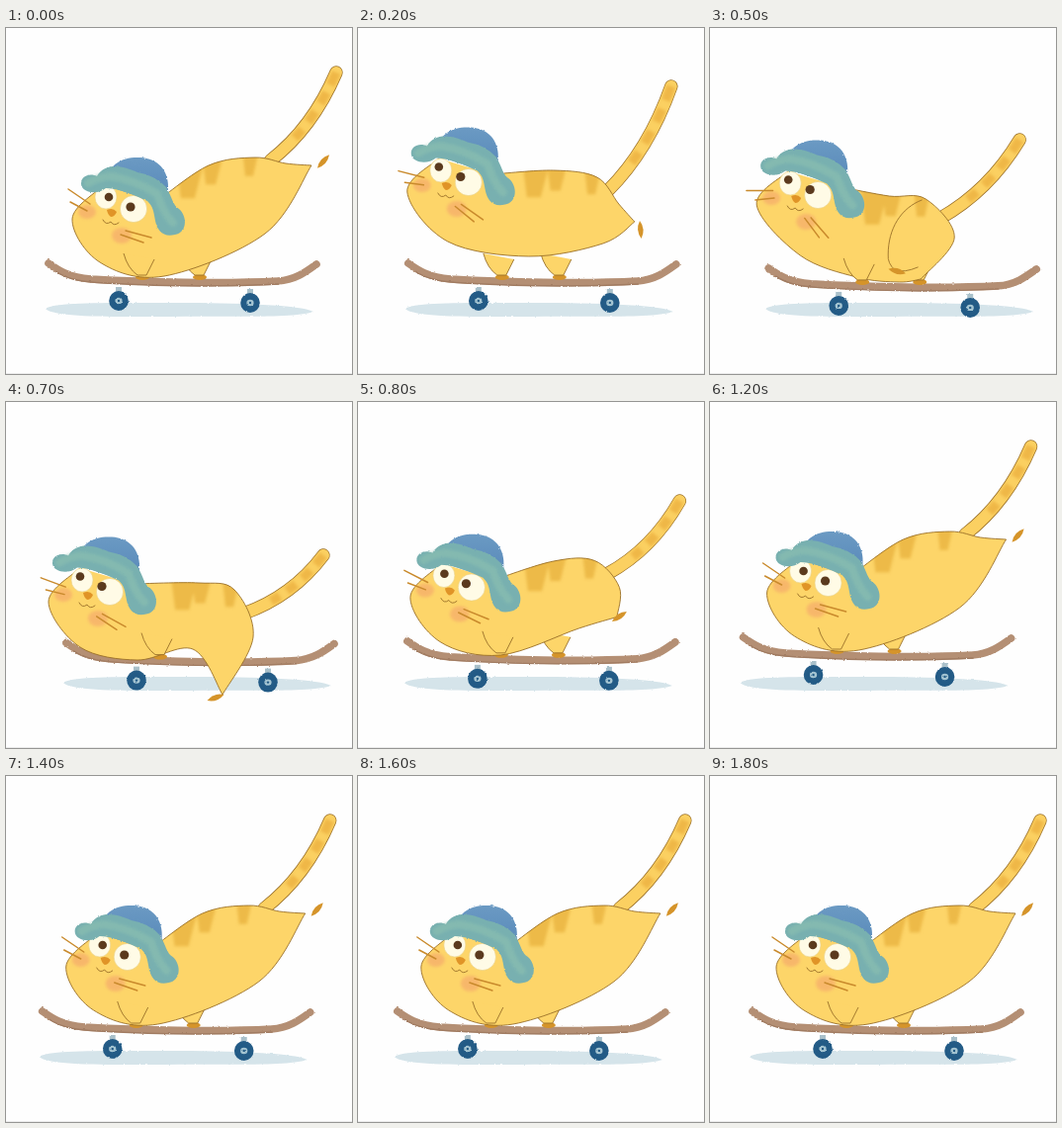
Animation, 350 px wide and 350 px high, one loop 1900 ms. Source, as an HTML page:

```html
<!DOCTYPE html>
<html lang="en">
<head>
<meta charset="utf-8">
<title>Skating cat</title>
<style>
  html, body { margin: 0; width: 100%; height: 100%; overflow: hidden; background: #fefefe; }
  svg { display: block; width: 100vw; height: 100vh; }
  .line { fill: none; stroke: #9a7029; stroke-width: .9; stroke-linecap: round; stroke-linejoin: round; }
  .fur { fill: #fdd569; }
  .leg { stroke: #9a7029; stroke-width: .9; stroke-linejoin: round; }
  .paw { fill: #d5942a; }
</style>
</head>
<body>
<svg viewBox="0 0 350 350">
  <defs>
    <filter id="rough" filterUnits="userSpaceOnUse" x="-100" y="-100" width="550" height="550" color-interpolation-filters="sRGB">
      <feTurbulence type="fractalNoise" baseFrequency=".45" numOctaves="2" seed="4"/>
      <feDisplacementMap in="SourceGraphic" scale="2.2" xChannelSelector="R" yChannelSelector="G"/>
      <feGaussianBlur stdDeviation=".5"/>
    </filter>
    <filter id="soft" filterUnits="userSpaceOnUse" x="-100" y="-100" width="550" height="550" color-interpolation-filters="sRGB">
      <feGaussianBlur stdDeviation="1.6"/>
    </filter>
    <linearGradient id="wool" x1="0" y1="0" x2="0" y2="1">
      <stop offset="0" stop-color="#6b9ac3"/>
      <stop offset="1" stop-color="#5586b8"/>
    </linearGradient>
    <clipPath id="inside"><path id="clip"/></clipPath>
    <g id="wheel">
      <path d="M0-14V-8" stroke="#a9c0ca" stroke-width="6"/>
      <ellipse rx="9.8" ry="10" fill="#235b86"/>
      <ellipse rx="3.6" ry="3.2" fill="#a5c5d2"/>
      <circle r="1.2" fill="#235b86"/>
    </g>
  </defs>

  <path d="M0 349.5H350" stroke="#ececec"/>
  <path id="shadow" d="M40 284C48 277 105 278 170 278C235 278 298 280 311 287C290 294 225 291 165 292C110 292 48 293 40 284Z" fill="#d5e4ea" filter="url(#rough)"/>

  <g id="board" filter="url(#rough)">
    <use href="#wheel" x="114" y="277"/>
    <use href="#wheel" x="247" y="279"/>
    <path d="M43 239C53 246 63 253 86 255C140 258 220 260 275 257C292 256 303 248 314 240" fill="none" stroke="#b48f74" stroke-width="7.6" stroke-linecap="round"/>
    <path d="M50 247C63 256 80 258 100 259C150 262 220 263 276 260" fill="none" stroke="#a17c62" stroke-width="1.4"/>
  </g>

  <g id="cat">
    <g fill="none" stroke-linecap="round">
      <path class="tail" stroke="#9a7029" stroke-width="13.4"/>
      <path class="tail" stroke="#fbd061" stroke-width="12"/>
      <path class="tail" stroke="#efb747" stroke-width="9" stroke-linecap="butt" pathLength="100" stroke-dasharray="0 30 10 9 11 9 11 8 12" filter="url(#soft)"/>
    </g>
    <ellipse class="foot paw" rx="7" ry="3"/><path class="leg fur"/>
    <ellipse class="foot paw" rx="7" ry="3"/>
    <path id="body" class="fur"/>
    <path id="stripes" fill="#edba48" clip-path="url(#inside)" filter="url(#soft)"/>
    <path id="outline" class="line"/>
    <path class="leg fur"/>
    <path id="thigh" class="line" d="M171 245Q163 238 164 229C164 203 177 182 198 174M171 245Q180 248 194 242"/>
    <path id="hind" class="paw" d="M-9 0Q0-5.5 9 0Q0 5.5-9 0Z"/>

    <g id="head">
      <g fill="#f3a06c" opacity=".55" filter="url(#soft)">
        <ellipse cx="-47" cy="3" rx="9" ry="7"/>
        <ellipse cx="-12" cy="27" rx="10" ry="8"/>
      </g>
      <g fill="#fffbe6" stroke="#e9cf80" stroke-width=".6">
        <ellipse cx="-28" cy="-12" rx="11" ry="12"/>
        <circle r="13.6"/>
      </g>
      <g class="gaze" fill="#5b3a1e">
        <circle cx="-25" cy="-12" r="4.3"/>
        <circle cx="-3" cy="-2" r="4.6"/>
      </g>
      <path d="M-27 1Q-21-2-17 3Q-19 8-23 8Q-26 6-27 1Z" fill="#e09427"/>
      <path class="line" d="M-31 11Q-28 17-23 13Q-20 18-15 14"/>
      <g fill="none" stroke="#c98a2c" stroke-width="1.5" stroke-linecap="round">
        <path class="whisk" d="M-44-5L-66-20M-47 2L-64-7"/>
        <path class="whisk" d="M-8 22L18 29M-13 26L10 34"/>
      </g>
      <g class="gaze" filter="url(#rough)">
        <path d="M-29-24C-26-46-11-53 7-52C25-51 35-39 35-22C35-10 30-5 28-5Z" fill="url(#wool)"/>
        <path d="M-53-25C-54-33-44-37-37-33C-28-48-10-43 4-37Q22-34 33-22C39-12 40-3 46 0C55 8 54 24 42 26C30 29 24 22 22 12C20 2 20-2 14-8C0-14-12-20-28-21C-36-14-52-16-53-25Z" fill="#78b0b0"/>
        <path d="M-46-26Q-36-32-24-33Q0-30 24-15Q30 4 40 14" fill="none" stroke="#8cc0b0" stroke-width="8" stroke-linecap="round" opacity=".6" filter="url(#soft)"/>
      </g>
    </g>
  </g>
</svg>

<script>
const STEP = 100, LOOP = 1900;

// Key points of each pose, relative to the board; "at" is its step in the loop.
const glide = {
  at: 0, head: [129, 183], back: [205, 139], rump: [252, 131], hip: [283, 137], tip: [309, 139],
  under: [262, 208], belly: [160, 251], chest: [95, 237], tail: [334, 45], hind: [321, 135, -48], whisk: [0]
};
const stand = {
  at: 2, head: [104, 156], back: [190, 144], rump: [234, 151], hip: [256, 178], tip: [272, 196],
  under: [240, 218], belly: [165, 231], chest: [83, 216], tail: [309, 59], hind: [278, 204, -95], whisk: [20]
};
const tuck = {
  at: 5, head: [93, 169], back: [165, 170], rump: [202, 173], hip: [231, 212], tip: [197, 254],
  under: [175, 257], belly: [132, 252], chest: [75, 230], tail: [297, 113], hind: [173, 246, -165], whisk: [34]
};
const push = {
  at: 7, head: [87, 192], back: [177, 183], rump: [213, 190], hip: [232, 238], tip: [201, 296],
  under: [171, 250], belly: [115, 261], chest: [57, 248], tail: [303, 155], hind: [194, 299, -200], whisk: [14]
};
const poses = [glide, stand, tuck, push, { ...glide, at: 10, hind: [321, 135, -228] }];

const $ = s => document.querySelector(s);
const $$ = s => [...document.querySelectorAll(s)];
const set = (el, name, v) => el.setAttribute(name, v);
const move = (el, x, y, more = '') => set(el, 'transform', `translate(${x} ${y}) ${more}`);
const add = ([x, y], dx, dy) => [x + dx, y + dy];
const mix = (a, b, f) => a.map((v, i) => v + (b[i] - v) * f);
const easeOut = u => Math.sin(u * Math.PI / 2);

// The board drifts back, shoots ahead on the push, then coasts.
const slide = k => k < 7 ? 18 * easeOut(k / 7) : k < 11 ? 18 - 29 * easeOut((k - 7) / 4) : 11 * (k - 18) / 7;
const bob = k => 7 * Math.max(0, 1 - Math.abs(k - 6.2) / 4) - 1;

function poseAt(k) {
  const i = poses.findIndex(p => p.at > k);
  if (i < 0) return glide;
  const a = poses[i - 1], b = poses[i], u = (k - a.at) / (b.at - a.at);
  const f = a === push ? easeOut(u) : u, out = {};
  for (const key in a) if (key !== 'at') out[key] = mix(a[key], b[key], f);
  return out;
}

// Smooth curve through points, without the opening move.
function spline(pts) {
  const at = i => pts[Math.max(0, Math.min(i, pts.length - 1))];
  return pts.slice(1).map((p, i) => {
    const c1 = at(i).map((v, j) => v + (p[j] - at(i - 1)[j]) / 6);
    const c2 = p.map((v, j) => v - (at(i + 2)[j] - at(i)[j]) / 6);
    return `C${[...c1, ...c2, ...p]}`;
  }).join('');
}

const parts = {};
for (const id of ['shadow', 'board', 'cat', 'body', 'clip', 'outline', 'stripes', 'thigh', 'hind', 'head'])
  parts[id] = $('#' + id);
for (const name of ['tail', 'leg', 'foot', 'gaze', 'whisk']) parts[name] = $$('.' + name);

function drawLeg(i, x, y) {
  set(parts.leg[i], 'd', `M${x - 16} ${y - 23}Q${x - 12} ${y - 8} ${x - 2} ${y - 1}H${x + 7}L${x + 15} ${y - 17}`);
  move(parts.foot[i], x + 3, y + 1);
}

function draw(k) {
  const p = poseAt(k), dx = slide(k), dy = bob(k), w = p.whisk[0];
  move(parts.shadow, dx, 0);
  move(parts.board, dx, dy);
  move(parts.cat, dx, 0);

  const neck = add(p.head, 24, -8), face = add(p.head, -62, 10), brow = add(p.head, -30, -24);
  const shape = `M${neck}` + spline([neck, p.back, p.rump, p.hip, p.tip])
    + spline([p.tip, p.under, p.belly, p.chest, face, brow]);
  for (const id of ['body', 'clip', 'outline']) set(parts[id], 'd', shape);

  const root = mix(p.rump, p.hip, .5), bend = add(mix(root, p.tail, .5), 9, 12);
  parts.tail.forEach(el => set(el, 'd', `M${root}Q${bend} ${p.tail}`));

  const wedge = (t, width, len) =>
    `M${add(mix(p.back, p.rump, t), -width / 2, -6)}h${width}l${-width / 3} ${len}h${-width / 2}Z`;
  set(parts.stripes, 'd', wedge(-.4, 28, 36) + wedge(.08, 20, 26) + wedge(.9, 16, 24));

  drawLeg(0, 193, 252 + dy);
  drawLeg(1, 135, 252 + dy);

  const [hx, hy, turn] = p.hind, glance = Math.min(1, w / 14);
  move(parts.hind, hx, hy, `rotate(${turn})`);
  move(parts.head, ...p.head);
  parts.gaze.forEach(el => move(el, -5 * glance, -3.5 * glance));
  set(parts.whisk[0], 'transform', `rotate(${-w} -44 -2)`);
  set(parts.whisk[1], 'transform', `rotate(${w} -9 24)`);
  set(parts.thigh, 'opacity', Math.max(0, 1 - Math.abs(k - 5) / 2));
}

let shown = -1;
function tick() {
  const k = Math.floor(performance.now() % LOOP / STEP);
  if (k !== shown) draw(shown = k);
  requestAnimationFrame(tick);
}
tick();
</script>
</body>
</html>
```
